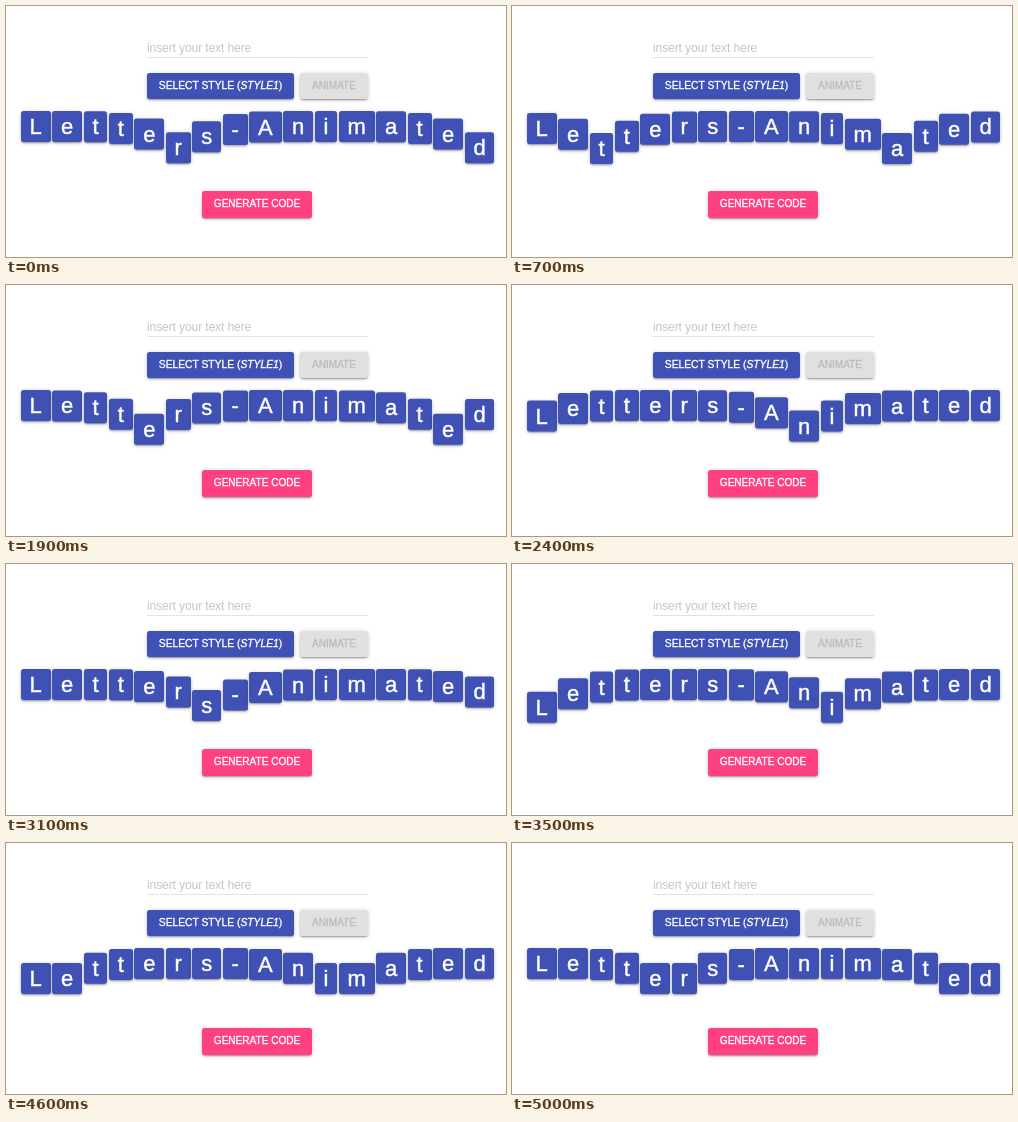
Recreate the animation shown at these times as an HTML page. Size 500x251 px, loop 5100 ms.

```html
<!DOCTYPE html>
<html lang="en">
<head>
<meta charset="utf-8">
<title>Letters</title>
<style>
  html, body { margin: 0; width: 100%; height: 100%; overflow: hidden; background: #fff; }
  body { position: relative; font-family: "Liberation Sans", Arial, sans-serif; }

  .field {
    position: absolute; left: 141px; top: 32.5px; width: 221px; height: 18.5px;
    border-bottom: 1px solid #e2e2e2;
    font-size: 12.2px; line-height: 19px; letter-spacing: -.17px; color: #c6c6c6; white-space: nowrap;
  }

  .button, .tile {
    border-radius: 2.5px; color: #fff; background: #3f51b5; text-align: center; white-space: pre;
    box-shadow: 0 1.5px 1.5px rgba(0,0,0,.14), 0 2.2px 1px -1.5px rgba(0,0,0,.2), 0 .8px 4px rgba(0,0,0,.2);
  }
  .button {
    position: absolute; top: 66.5px; height: 26.5px; line-height: 26.5px; font-size: 10.05px;
    -webkit-text-stroke: .35px currentColor;
  }
  .style { left: 141px; width: 147px; font-size: 10.3px; }
  .animate { left: 294px; width: 68px; color: #bcbcbc; background: #e0e0e0; }
  .generate { left: 196px; top: 185.4px; width: 110px; background: #ff4081; }

  .word { position: absolute; left: 14.6px; top: 104.7px; display: flex; }
  .tile {
    flex: none; height: 31.7px; line-height: 31.7px; padding: 0 8.85px; margin-right: 1.55px;
    font-size: 22px; -webkit-text-stroke: .45px currentColor;
  }
</style>
</head>
<body>
  <div class="field">insert your text here</div>
  <div class="button style">SELECT STYLE (<i>STYLE1</i>)</div>
  <div class="button animate">ANIMATE</div>
  <div class="word"></div>
  <div class="button generate">GENERATE CODE</div>

<script>
  const LOOP = 5100, STEP = 100, PERIOD = 10, DROP = 24, SHARPNESS = 4.5;

  // [time in ms, crest position in letters]
  const crest = [
    [0, 5.13], [200, 7.1], [700, 12.1], [1400, 18.85], [2400, 29.17],
    [3100, 36.15], [3900, 43.96], [4300, 48], [4600, 50.5], [5000, 54.5]
  ];
  // The wave stands still between these times
  const holds = [[200, 700], [4300, 4600]];

  const word = document.querySelector('.word');
  const tiles = [...'Letters-Animated'].map(letter => {
    const tile = document.createElement('div');
    tile.className = 'tile';
    tile.textContent = letter;
    word.append(tile);
    return tile;
  });

  function crestAt(time) {
    let t = Math.floor(time / STEP) * STEP;
    for (const [from, to] of holds) if (t >= from && t < to) t = from;
    const i = Math.max(1, crest.findIndex(point => point[0] >= t));
    const [t0, p0] = crest[i - 1], [t1, p1] = crest[i];
    return p0 + (p1 - p0) * (t - t0) / (t1 - t0);
  }

  function draw(time) {
    const peak = crestAt(time);
    tiles.forEach((tile, i) => {
      const gap = (((i - peak) % PERIOD) + PERIOD) % PERIOD;
      const near = 1 - Math.min(gap, PERIOD - gap) / (PERIOD / 2);
      tile.style.transform = `translateY(${(DROP * near ** SHARPNESS).toFixed(2)}px)`;
    });
  }

  const start = performance.now();
  function frame() {
    draw((performance.now() - start) % LOOP);
    requestAnimationFrame(frame);
  }
  frame();
</script>
</body>
</html>
```
